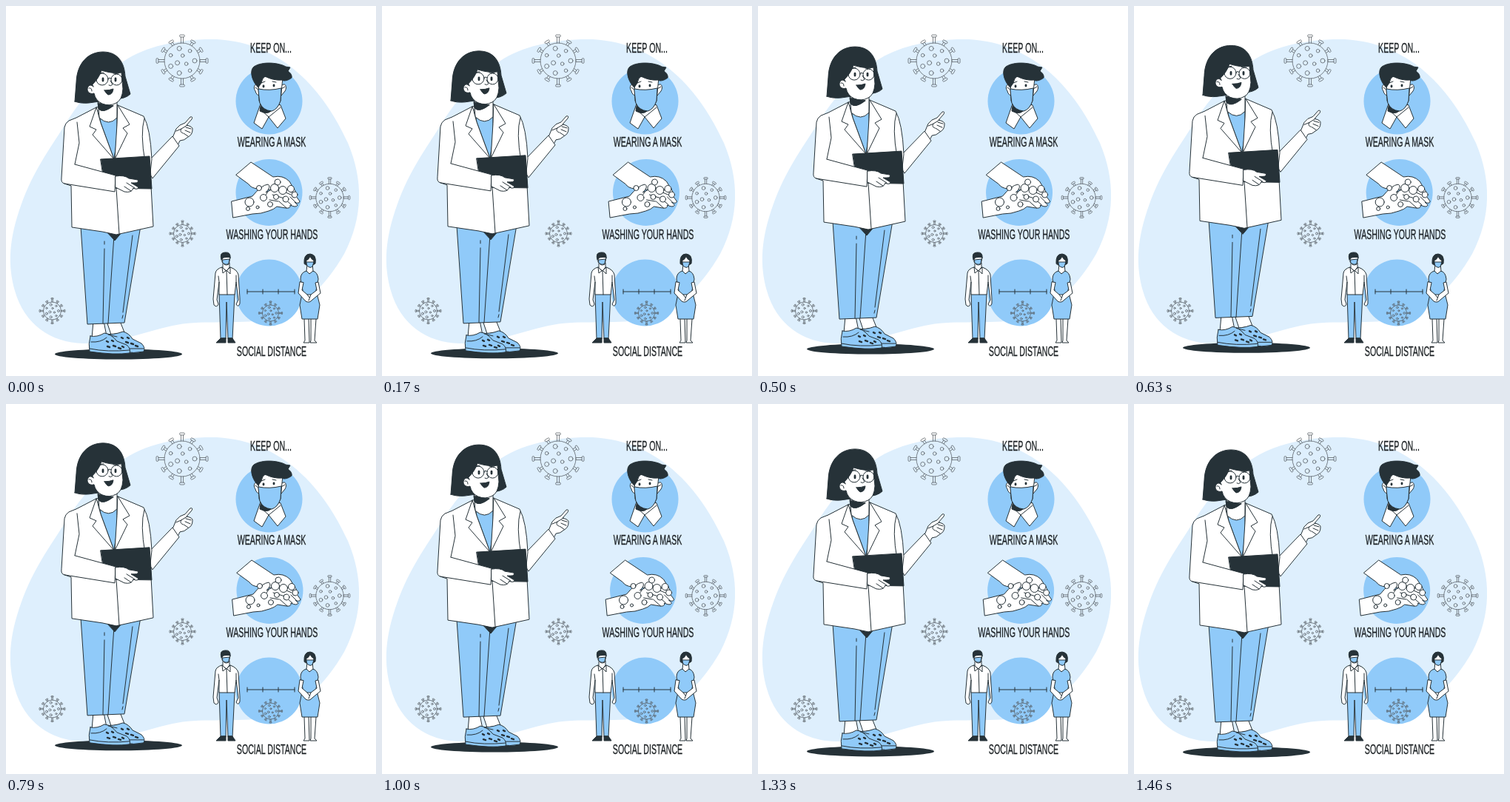
Animation of 500 by 500 pixels, one loop 1500 ms. Source, as an HTML page:

```html
<!DOCTYPE html>
<html lang="en">
<head>
<meta charset="utf-8">
<title>Keep on</title>
<style>
html, body { margin: 0; width: 100%; height: 100%; overflow: hidden; background: #fff; }
svg { display: block; width: 100%; height: 100%; }
path, circle { fill: #fff; stroke: #263238; stroke-width: 1; stroke-linejoin: round; stroke-linecap: round; }
.dark { fill: #263238; }
.blue { fill: #90caf9; }
.line { fill: none; }
.disc { fill: #90caf9; stroke: none; }
.blob { fill: #deeffd; stroke: none; }
.plain { stroke: none; }
.holes { fill: none; stroke-width: 2.4; }
.eyes { fill: none; stroke-width: 2.8; }
.virus * { fill: none; stroke: #555b60; stroke-width: .75; vector-effect: non-scaling-stroke; }
text { font: 18px "Liberation Sans", Arial, sans-serif; fill: #1d2225; stroke: #1d2225; stroke-width: .35; text-anchor: middle; }
</style>
</head>
<body>
<svg viewBox="0 0 500 500">
  <path class="blob" d="M160 74C190 54 235 44 285 45C375 50 430 115 462 185C483 235 483 285 457 335C432 378 395 418 345 425C300 430 262 424 225 432C185 441 150 456 105 456C60 455 25 430 12 385C2 350 4 315 20 270C37 222 60 192 78 163C98 130 125 97 160 74Z"/>
  <circle class="disc" cx="355.500" cy="128.500" r="45"/>
  <circle class="disc" cx="355.500" cy="387.500" r="45"/>
  <g id="viruses"></g>
  <g id="labels"></g>

  <g id="maskedMan">
    <path d="M344 132L335 158L346 166L355 150L367 165L378 152L371 134Z"/>
    <path class="dark" d="M344 135L343 142Q350 146 355 144L366 137Z"/>
    <path class="line" d="M343 139L355 150L371 137"/>
    <path d="M342 107C337 103 333 109 337 115C338 119 340 121 343 121M373 107C378 103 380 110 377 115L372 121"/>
    <path d="M341 96L342 128Q345 138 355 141Q367 141 371 128L374 96Z"/>
    <path class="dark" d="M338 107C332 99 329 87 335 82C347 74 370 77 378 82L384 83L381 88Q387 92 386 97C381 101 375 102 373 100Q361 101 350 95Q346 98 345 104L341 110Z"/>
    <path class="blue" d="M341 112Q356 115 372 111L371 128Q367 140 359 142Q347 141 343 131Z"/>
    <path class="line" d="M337 110L341 113M377 109L372 112M345 104L350 102M360 102L365 103"/>
    <path class="eyes" d="M348 108V109M362 107V108"/>
  </g>

  <g id="hands">
    <circle class="disc" cx="355.500" cy="252" r="45"/>
    <path d="M311 228L331 211L361 231Q374 228 383 237L389 247Q394 253 391 257Q387 259 381 253L363 248Q350 249 340 247Q331 246 328 241Z"/>
    <path d="M305 264L333 257Q345 242 354 241Q359 244 351 252L363 246Q379 246 384 250Q392 255 397 264Q396 268 390 265L394 269Q392 273 384 269Q385 274 378 273L366 271Q362 275 355 277Q345 281 333 281L307 286Z"/>
    <path class="line" d="M384 258L391 265M377 261L386 269M369 264L379 273M366 247L385 255M354 251L347 261M360 255L376 260M356 262L368 264"/>
    <g id="bubbles"></g>
  </g>

  <g id="distance">
    <path class="line" d="M326 386H390M326 383V389M347 383V389M368 383V389M390 383V389"/>
    <path class="blue" d="M288 389L290 450H297L298 400L300 450H306L309 389Z"/>
    <path class="dark" d="M290 449L284 455H297V449ZM300 449L300 455H310L306 449Z"/>
    <path d="M292 353Q284 355 283 361L280 396L281 404Q285 408 287 403L285 397L288 373V390H309L311 373L314 397L311 403Q314 408 316 402L316 396L314 363Q312 356 303 353L298 358Z"/>
    <path class="line" d="M288 373L287 365M311 373V364M298 358L299 390M292 353L293 361L298 357L303 362L303 353"/>
    <path d="M293 348V354L298 358L302 353V347Z"/>
    <path d="M292 339V346Q296 352 301 349L303 340Z"/>
    <path class="dark" d="M291 343Q288 333 296 333Q304 332 303 341L301 339L294 340Z"/>
    <path class="blue" d="M293 343L302 342L301 348Q297 351 293 347Z"/>

    <path d="M403 423L404 452L402 455H410L409 423ZM412 423V452L411 455H420L417 452L419 423Z"/>
    <path class="blue" d="M406 358Q398 360 398 369L401 384L397 404L400 423H421L424 404L419 384L422 369Q421 359 414 358L410 361Z"/>
    <path d="M397 373L395 388L405 399Q410 402 414 397L425 388L422 373L418 374L420 384L412 390H407L400 384L402 374Z"/>
    <path class="line" d="M407 390L410 394M412 390L409 398"/>
    <path d="M407 349L406 358L410 362L415 358L414 349Z"/>
    <path class="dark" d="M403 348Q402 335 411 335Q420 336 418 348L415 350H406Z"/>
    <path d="M406 344Q410 342 411 338Q412 342 416 344L415 350Q411 356 407 350Z"/>
    <path class="blue" d="M406 346L416 346L414 352Q411 355 407 351Z"/>
  </g>

  <g id="doctor">
    <path class="dark plain" d="M66 470.500A86 7 0 0 1 238 470.500A86 7 0 0 1 66 470.500Z"/>
    <path d="M118 426L116 449L136 446L132 426ZM136 426L142 444L160 441L154 426Z"/>
    <path class="blue" d="M134 443Q145 445 158 440Q166 442 171 450L183 456Q189 462 186 467Q173 470 158 467L140 460Z"/>
    <path class="blue" d="M114 446Q123 448 133 442Q142 443 150 453L163 458Q169 463 167 469Q148 472 113 467Q111 457 114 446Z"/>
    <path class="line" d="M113 463Q137 468 167 465M167 463L186 463M115 454Q128 455 136 448M138 444L150 447"/>
    <path class="holes" d="M136 453L138 454M143 452L145 453M137 460L140 461M145 459L148 460M152 462L155 463M157 460L159 461M156 448L158 449M164 448L166 449M162 454L165 455M169 456L172 457M175 459L178 460"/>
    <path class="blue" d="M101 298L110 430L160 428L182 297Z"/>
    <path class="line" d="M133 318V322M133 328L131 429M146 310L138 429M171 310L158 414M158 418L157 422"/>
    <path class="dark" d="M134 303L147 317L158 304Z"/>

    <path d="M225 178L230 166Q234 160 242 158L249 150Q253 149 251 153L244 161Q253 163 252 167Q252 174 246 177Q241 182 235 182L232 188Z"/>
    <path class="line" d="M230 169L237 166L245 161M237 166Q234 170 239 172M243 164L250 166M242 168L249 171M240 172L246 176"/>
    <path d="M186 199L195 207L225 176L234 189L198 233L190 220Z"/>
    <path d="M122 137L95 151L85 155Q80 158 79 164L75 232Q74 239 79 240L88 243L89 299L130 305L149 309L199 298L195 225L197 207Q195 165 186 149L151 134Z"/>
    <path class="line" d="M96 157L99 185L93 214M187 152Q181 172 188 211M149 246L153 308"/>
    <path class="blue" d="M125 141L128 158L146 207L150 180L150 137Z"/>
    <path d="M124 124L126 151Q139 163 150 151V121Z"/>
    <path class="dark" d="M124 131L125 139Q131 146 145 135Z"/>
    <path d="M122 137L113 163L122 167L117 174L146 207L128 158ZM151 134L167 160L158 165L164 172L147 207L150 160Z"/>

    <path class="dark" d="M93 129L95 103C96 76 112 62 131 62C151 62 160 76 161 95L168 119Q162 125 148 126L112 131Q101 132 93 129Z"/>
    <path d="M117 106Q126 97 129 87Q145 92 156 90L158 112Q157 127 149 131Q140 136 130 132Q121 128 119 118C112 120 108 114 111 109Q114 105 118 109Z"/>
    <path class="line" d="M112 111Q116 110 116 115M141 101L144 106Q142 109 139 107M125 91L132 90M145 91L152 92M138 98Q140 96 142 98M122 99L116 102"/>
    <circle class="line" cx="130" cy="99" r="8"/>
    <circle class="line" cx="149.500" cy="99.500" r="7.500"/>
    <path class="eyes" d="M131 98V101M148 98V101"/>
    <path class="dark" d="M133 114Q140 114 145 112Q144 120 138 120Q135 118 133 114Z"/>

    <path class="dark" d="M128 207L194 203L197 247L134 246Z"/>
    <path class="plain" d="M77 232L93 214L148 229V251L88 242Z"/>
    <path class="line" d="M93 214L148 229L147 251L79 240"/>
    <path d="M148 230Q160 228 166 233L178 235Q180 239 174 239L169 239L179 245Q178 249 172 246Q170 253 160 251L148 245Z"/>
    <path class="line" d="M163 239L174 246M160 244L169 250"/>
  </g>
</svg>
<script>
const LOOP = 1500, TAU = Math.PI * 2;
const byId = id => document.getElementById(id);
const circle = (x, y, r) => `<circle cx="${x}" cy="${y}" r="${r}"/>`;

function virus(x, y, scale) {
  let parts = circle(0, 0, 24);
  for (let i = 0; i < 12; i++) {
    const tip = i % 3 ? 28 : 32;
    parts += `<path transform="rotate(${i * 30})" d="M-1.500-24V-${tip}M1.500-24V-${tip}M-2-${tip}a1.500 1.500 0 0 1 0-3h4a1.500 1.500 0 0 1 0 3z"/>`;
  }
  for (let i = 0; i < 10; i++) {
    const inner = i < 3, r = inner ? 7 : 17, a = TAU * (inner ? i / 3 + .1 : i / 7);
    parts += circle(r * Math.cos(a), r * Math.sin(a), i % 2 ? 3 : 2.3);
  }
  return `<g class="virus" transform="translate(${x} ${y}) scale(${scale})">${parts}</g>`;
}

byId('viruses').innerHTML = [
  [238, 74, 1], [437.5, 259, .78], [238.5, 307.5, .5], [62.5, 412, .5], [357.5, 415, .46]
].map(v => virus(...v)).join('');

byId('bubbles').innerHTML = [
  [329, 265, 6], [348, 259, 4.5], [342, 246, 3.5], [363, 246, 5.5], [367, 238, 4], [374, 249, 5.5],
  [385, 247, 4.5], [378, 261, 4], [390, 255, 4], [357, 268, 3.5], [340, 272, 2], [327, 274, 2.5], [365, 258, 3.5]
].map(b => circle(...b)).join('');

// One shared condensed style for all labels
byId('labels').innerHTML = [
  ['KEEP ON...', 358, 62.5], ['WEARING A MASK', 359, 189.5],
  ['WASHING YOUR HANDS', 359.5, 315], ['SOCIAL DISTANCE', 359, 473]
].map(([label, x, y]) => `<text transform="translate(${x} ${y}) scale(.59 1)">${label}</text>`).join('');

function draw(now) {
  const t = now % LOOP, p = t / LOOP;
  const lift = -4.6 * (1 - Math.cos(TAU * p));
  const sway = 4.2 * Math.sin(Math.PI * p) * Math.sin(TAU * (t - 60) / 500);
  byId('doctor').setAttribute('transform', `translate(0 ${lift})`);
  byId('hands').setAttribute('transform', `translate(${sway} 0)`);
  requestAnimationFrame(draw);
}
requestAnimationFrame(draw);
</script>
</body>
</html>
```
